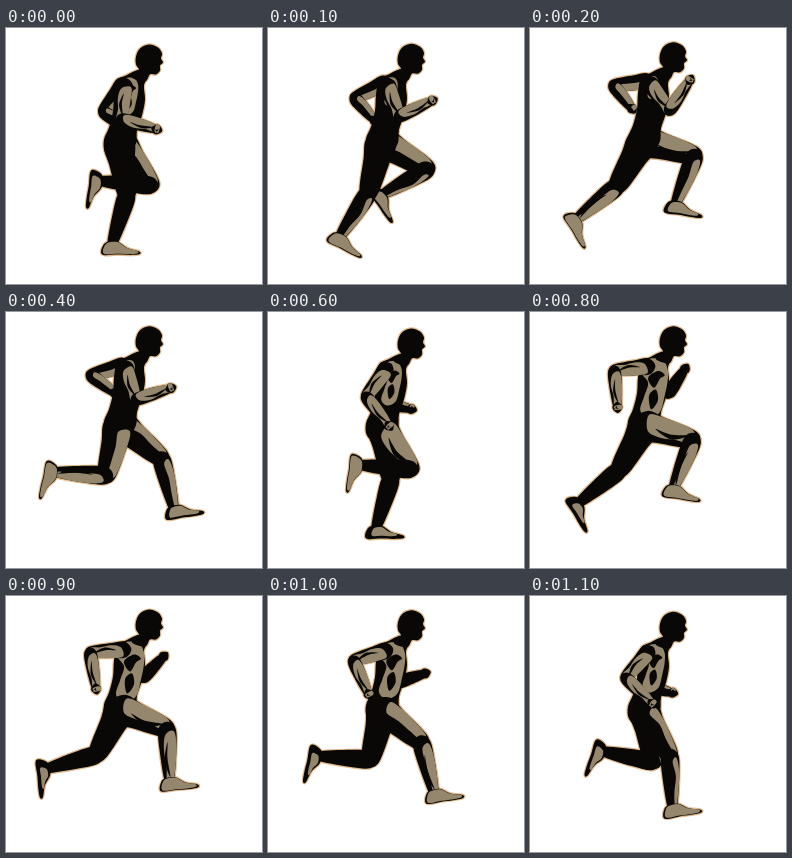
Animation of 256 by 256 pixels, one loop 1200 ms. Source, as an HTML page with a canvas:

```html
<!DOCTYPE html>
<html lang="en">
<head>
<meta charset="utf-8">
<title>Runner</title>
<style>
html, body { margin: 0; width: 100%; height: 100%; overflow: hidden; background: #fff; }
canvas { display: block; width: 256px; height: 256px; }
</style>
</head>
<body>
<canvas id="stage" width="256" height="256"></canvas>
<script>
const ctx = document.getElementById('stage').getContext('2d');
const INK = '#090807', SKIN = '#94876d', FRINGE = '#e2b98b';
const STEP = 100, COUNT = 12;

// Angles in degrees from straight down, forward positive, at six even points of a stride
const gait = {
  thigh: [9, -30, -14, 36, 74, 51],
  shin: [-17, -51, -94, -95, -22, 14],
  foot: [88, 30, -14, -10, 79, 97],
  upperArm: [-7, 35, 17, -37, -84, -74],
  forearm: [74, 146, 108, 38, 5, 24]
};

const torso = [[134, 40], [120, 46], [111, 51], [108, 66], [107, 82], [103, 98], [98, 110],
  [99, 122], [109, 130], [122, 126], [130, 114], [131, 101], [136, 86], [139, 70],
  [138, 56], [142, 46]];
const chest = [[112, 53], [122, 47], [133, 49], [138, 58], [138, 70], [135, 85],
  [130, 102], [118, 108], [110, 100], [114, 86], [118, 72], [111, 62]];
const pec = [[118, 67], [128, 60], [135, 64], [130, 68], [124, 77]];
const belly = [[119, 85], [126, 79], [128, 90], [121, 99]];
const head = [[130, 27], [134, 19], [143, 15], [152, 18], [156, 24], [155, 29], [157, 33],
  [154, 36], [154, 41], [150, 45], [144, 45], [139, 52], [126, 48], [133, 41], [130, 35]];
const sole = [[-5, -4], [-9, 1], [-10, 7], [-6, 9], [6, 8], [18, 8], [28, 7], [28, 4], [16, 1], [6, -5]];

const wave = (step, peak) => .5 + .5 * Math.cos((step - peak) * 2 * Math.PI / COUNT);
const scale = (pts, [cx, cy], k) => pts.map(([x, y]) => [cx + (x - cx) * k, cy + (y - cy) * k]);

// Periodic Catmull-Rom interpolation, result in radians
function angle(name, step) {
  const keys = gait[name], n = keys.length;
  const pos = step * n / COUNT, i = Math.floor(pos), t = pos - i;
  const [a, b, c, d] = [-1, 0, 1, 2].map(k => keys[(i + k + n) % n]);
  const deg = b + t / 2 * (c - a + t * (2 * a - 5 * b + 4 * c - d + t * (3 * (b - c) + d - a)));
  return deg * Math.PI / 180;
}

const extend = ([x, y], dir, len) => [x + Math.sin(dir) * len, y + Math.cos(dir) * len];

function trace(pts) {
  const n = pts.length, at = i => pts[(i + n) % n];
  ctx.beginPath();
  ctx.moveTo(...pts[0]);
  for (let i = 0; i < n; i++) {
    const a = at(i - 1), b = at(i), c = at(i + 1), d = at(i + 2);
    ctx.bezierCurveTo(b[0] + (c[0] - a[0]) / 6, b[1] + (c[1] - a[1]) / 6,
      c[0] - (d[0] - b[0]) / 6, c[1] - (d[1] - b[1]) / 6, c[0], c[1]);
  }
  ctx.closePath();
}

// Tapered limb, lit from its front edge inwards
function limb(start, dir, len, [w0, w1, w2], light) {
  const at = (u, v) => extend(extend(start, dir, u * len), dir - Math.PI / 2, v);
  const inner = w => w * (2 * light - 1) * .95;
  return {
    body: [at(-w0 * .8 / len, 0), at(0, -w0), at(.38, -w1), at(1, -w2),
      at(1 + w2 * .8 / len, 0), at(1, w2), at(.38, w1), at(0, w0)],
    patch: light > .08 && [at(.06, -w0 * .8), at(.38, -w1), at(.95, -w2), at(1, inner(w2)),
      at(.7, inner(w2)), at(.4, inner(w1)), at(.12, inner(w0) * .5)],
    shades: light > .5 ? [[at(.25, 0), at(.55, w1 * .1), at(.9, -w2 * .3), at(.6, w1 * .45)]] : []
  };
}

function leg(hip, step, shine) {
  const thigh = angle('thigh', step), shin = angle('shin', step), tilt = angle('foot', step);
  const knee = extend(hip, thigh, 52), ankle = extend(knee, shin, 54);
  const body = sole.map(([x, y]) => extend(extend(ankle, tilt, x), tilt - Math.PI / 2, y));
  return [
    limb(hip, thigh, 52, [15, 13, 9], wave(step, 7) * .85 * shine),
    limb(knee, shin, 54, [8.5, 8.5, 4.5], Math.sin(step * Math.PI / 6) ** 2 * .75 * shine),
    { body, patch: scale(body, extend(ankle, tilt, 8), .55 + .35 * shine) }
  ];
}

function arm(shoulder, step, len, tuck, shine) {
  const upper = angle('upperArm', step);
  const lower = angle('forearm', step) + tuck * Math.max(0, -upper);
  const elbow = extend(shoulder, upper, 35), hand = extend(elbow, lower, len);
  return [
    limb(shoulder, upper, 35, [8, 7.5, 5.5], shine),
    limb(elbow, lower, len, [6, 6.5, 4], shine),
    limb(extend(hand, lower, -2), lower, 5, [4, 5, 4], shine)
  ];
}

function trunk(turn) {
  const shape = pts => scale(pts, [122, 50], .35 + .65 * turn);
  return { body: torso, patch: shape(chest), shades: [shape(pec), shape(belly)] };
}

function fill(pts, color) {
  trace(pts);
  ctx.fillStyle = color;
  ctx.fill();
}

function draw(step) {
  const other = (step + COUNT / 2) % COUNT;
  const turn = wave(step, 8.7);
  const parts = [
    ...arm([118, 54], other, 30, .4, .5 * (1 - turn)),
    ...leg([115, 114], other, .7 * (1 - turn)),
    trunk(turn),
    { body: head },
    ...leg([113, 114], step, 1),
    ...arm([119, 55], step, 37, 0, .88)
  ];
  ctx.fillStyle = '#fff';
  ctx.fillRect(0, 0, 256, 256);
  ctx.save();
  ctx.translate(0, 1.4 * Math.cos(step * 4 * Math.PI / COUNT));
  ctx.lineJoin = 'round';
  ctx.lineWidth = 2.4;
  ctx.strokeStyle = FRINGE;
  for (const p of parts) {
    trace(p.body);
    ctx.stroke();
  }
  for (const { body, patch, shades = [] } of parts) {
    fill(body, INK);
    if (patch) fill(patch, SKIN);
    for (const s of shades) fill(s, INK);
  }
  ctx.restore();
}

const start = performance.now();
function tick() {
  draw(Math.floor((performance.now() - start) / STEP) % COUNT);
  requestAnimationFrame(tick);
}
tick();
</script>
</body>
</html>
```
